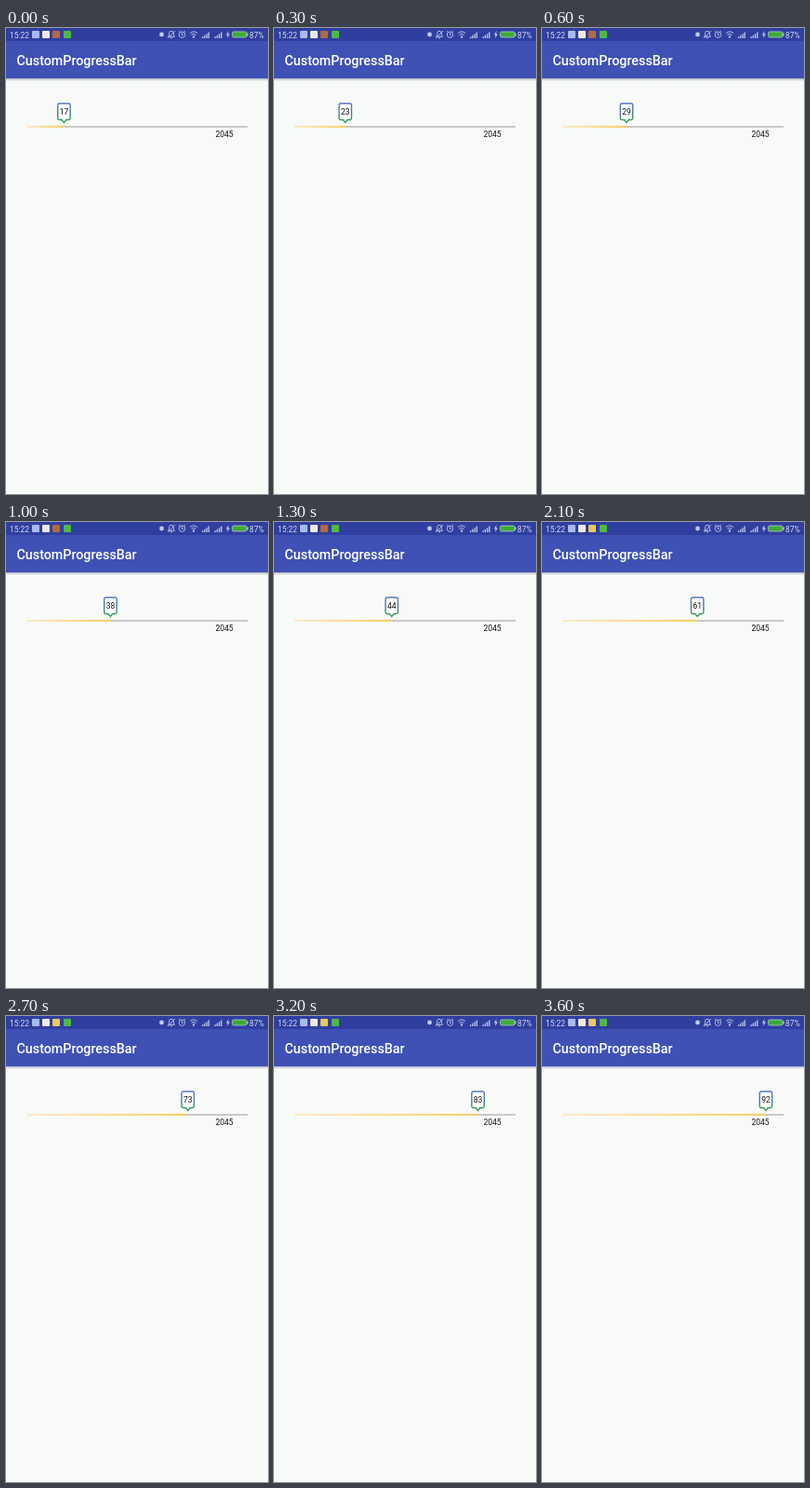
An HTML page for the animation above (3700 ms loop, 282x500 px).

```html
<!DOCTYPE html>
<html lang="en">
<head>
<meta charset="utf-8">
<title>Progress bar</title>
<style>
  html, body { margin: 0; width: 100%; height: 100%; overflow: hidden; background: #f8faf8; }
  svg { display: block; width: 282px; height: 500px; font-family: Roboto, sans-serif; }
</style>
</head>
<body>
<svg viewBox="0 0 282 500">
  <defs>
    <linearGradient id="fill">
      <stop offset="0" stop-color="#fbeccb"/>
      <stop offset="1" stop-color="#f6cf6b"/>
    </linearGradient>
    <linearGradient id="outline" x1="0" y1="0" x2="0" y2="1">
      <stop offset="0" stop-color="#5674c6"/>
      <stop offset=".55" stop-color="#40808e"/>
      <stop offset="1" stop-color="#2fa352"/>
    </linearGradient>
    <linearGradient id="shadow" x1="0" y1="0" x2="0" y2="1">
      <stop offset="0" stop-color="#50587c" stop-opacity=".45"/>
      <stop offset="1" stop-color="#50587c" stop-opacity="0"/>
    </linearGradient>
  </defs>

  <rect width="282" height="500" fill="#f8faf8"/>
  <rect y="54" width="282" height="3" fill="url(#shadow)"/>
  <rect width="282" height="54" fill="#3f51b5"/>
  <rect width="282" height="14" fill="#303f9f"/>
  <text x="11.5" y="40" font-size="14.3" font-weight="500" fill="#fff">CustomProgressBar</text>

  <!-- Status bar -->
  <g fill="#d6daf0" font-size="8.4">
    <text x="4" y="10.5">15:22</text>
    <text x="262" y="10.5">87%</text>
  </g>
  <rect x="28" y="3" width="8" height="8" rx="1" fill="#a9b9ea"/>
  <rect x="39" y="3" width="8" height="8" rx="1" fill="#ece9e0"/>
  <rect id="badge" x="50" y="3" width="8" height="8" rx="1"/>
  <rect x="62" y="3" width="8" height="8" rx="1" fill="#4fb848"/>
  <circle cx="167.5" cy="7" r="2.4" fill="#c3c9ea"/>
  <g fill="none" stroke="#c3c9ea" stroke-width=".9">
    <path d="M174.5 9.3 H181.5 L180.4 7.8 V5.6 Q180 3.3 178 3.3 Q175.8 3.3 175.6 5.6 V7.8 Z M177 10.8 H179 M174.3 11 L182 3"/>
    <circle cx="189.5" cy="7.2" r="3.2"/>
    <path d="M189.5 5.2 V7.4 H191 M185.8 4.4 L187.4 3 M193.2 4.4 L191.6 3"/>
    <path d="M198 5.6 Q202 2.2 206 5.6 M199.5 7.4 Q202 5.2 204.5 7.4 M200.8 9 Q202 8 203.2 9"/>
  </g>
  <g fill="#c3c9ea">
    <circle cx="202" cy="10" r=".9"/>
    <path id="signal" d="M211 9.2h1.3v1.8h-1.3z M213.2 7.8h1.3v3.2h-1.3z M215.4 6.2h1.3v4.8h-1.3z M217.6 4.4h1.3v6.6h-1.3z"/>
    <use href="#signal" x="13.5"/>
    <path d="M239.6 3 L236.8 7.5 H238.6 L237.8 11 L241 6.4 H239.1 Z"/>
    <rect x="259.2" y="5.5" width="1.3" height="3"/>
  </g>
  <rect x="243.5" y="4" width="15.5" height="6" rx="1.5" fill="#3cab36" stroke="#b3c7d3" stroke-width=".8"/>

  <!-- Progress -->
  <rect x="22" y="105" width="238" height="2" fill="#c9c9ca"/>
  <rect id="bar" x="22" y="104.8" height="2.2" fill="url(#fill)"/>
  <text x="225.4" y="117.3" font-size="8.5" fill="#111">2045</text>
  <g id="bubble">
    <path d="M-5 81 H5 Q6.7 81 6.7 82.7 V96.8 Q6.7 98.5 5 98.5 H2.3 L0 101.4 L-2.3 98.5 H-5 Q-6.7 98.5 -6.7 96.8 V82.7 Q-6.7 81 -5 81 Z"
      fill="#fff" stroke="url(#outline)" stroke-width="1.4"/>
    <text id="label" y="93.2" font-size="8.5" text-anchor="middle" fill="#111"></text>
  </g>
</svg>
<script>
  const LOOP = 3700, STEP = 100, LEFT = 22, UNIT = 2.38;
  const [bar, bubble, label, badge] =
    ["bar", "bubble", "label", "badge"].map(id => document.getElementById(id));

  function draw(time) {
    const step = Math.floor((time % LOOP) / STEP);
    const value = Math.floor(17.35 + 2.08 * step);
    const width = value * UNIT;
    bar.setAttribute("width", width);
    bubble.setAttribute("transform", `translate(${LEFT + width} 0)`);
    label.textContent = value;
    badge.setAttribute("fill", step < 19 ? "#b3683f" : "#ecc75a");
  }

  const start = performance.now();
  function tick() {
    draw(performance.now() - start);
    requestAnimationFrame(tick);
  }
  tick();
</script>
</body>
</html>
```
